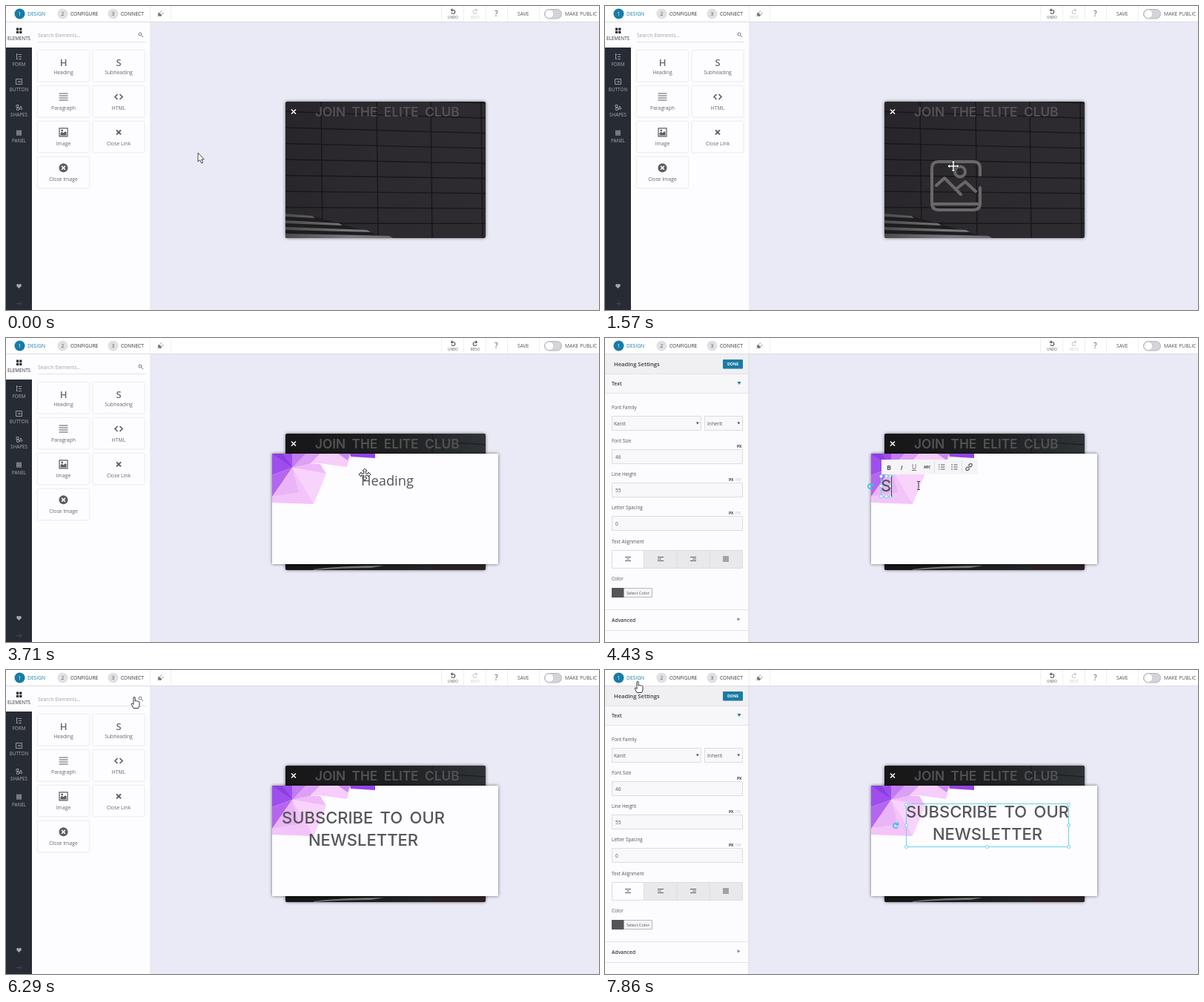
Animation, 800 px wide and 410 px high, one loop 8000 ms. Source, as an HTML page:

```html
<!DOCTYPE html>
<html lang="en">
<head>
<meta charset="utf-8">
<title>Popup editor</title>
<style>
html, body { margin: 0; width: 800px; height: 410px; overflow: hidden; background: #e9eaf6; }
svg { position: absolute; left: 0; top: 0; display: block; }
text { font-family: "Open Sans", sans-serif; fill: #55555a; }
.mid { text-anchor: middle; }
.semi { font-weight: 600; fill: #3c3c42; }
.ln { fill: none; stroke: #5c5c60; stroke-width: 1.2; }
.tile { fill: #fdfcfe; filter: drop-shadow(0 .8px .8px rgba(40, 40, 60, .2)); }
.tile.hot { filter: drop-shadow(0 1px 2px rgba(40, 40, 60, .5)); }
#tiles text { fill: #68686c; }
.join { font: 600 17.3px Inter, sans-serif; word-spacing: 4px; fill: #525154; }
#head { position: absolute; white-space: pre; text-align: center; line-height: 29.5px; color: #55555a;
  font-family: "Open Sans", sans-serif; font-size: 18.3px; }
#head.big { font: 500 22px/29.5px Inter, sans-serif; word-spacing: 3.5px; }
#frame { position: absolute; inset: 0 -.5px; border: 1px solid #69d3e8; box-sizing: border-box; }
#frame i { position: absolute; width: 3px; height: 3px; margin: -2.5px; border: 1px solid #69d3e8; border-radius: 50%; background: #fff; }
#frame svg { left: -20px; top: calc(50% - 5px); overflow: visible; }
#caret { position: absolute; right: -1px; top: 1px; bottom: 1px; width: 1px; background: #444; }
</style>
</head>
<body>
<svg id="base" width="800" height="410">
  <defs>
    <linearGradient id="wall" x2="1" y2=".25">
      <stop offset="0" stop-color="#272529"/><stop offset=".5" stop-color="#2c2a2e"/><stop offset="1" stop-color="#2d2b2f"/>
    </linearGradient>
    <linearGradient id="stair"><stop offset="0" stop-color="#4b4a4d"/><stop offset=".6" stop-color="#7c7a7e"/><stop offset="1" stop-color="#6a686c"/></linearGradient>
    <linearGradient id="shade"><stop offset="0" stop-color="#161617"/><stop offset=".55" stop-color="#1f2022"/><stop offset="1" stop-color="#2f3337"/></linearGradient>
    <filter id="lift" x="-10%" y="-10%" width="120%" height="120%">
      <feDropShadow dx="0" dy="0" stdDeviation="2" flood-color="#000" flood-opacity=".55"/>
    </filter>
    <clipPath id="cardClip"><rect x="377" y="129" width="270" height="184" rx="3"/></clipPath>
  </defs>

  <rect width="800" height="410" fill="#e9eaf6"/>
  <rect x="377" y="129" width="270" height="184" rx="3" fill="#242326" filter="url(#lift)"/>
  <g clip-path="url(#cardClip)">
    <rect x="377" y="129" width="270" height="184" fill="url(#wall)"/>
    <g id="bricks" fill="none" stroke="#171619" stroke-width="1.4"></g>
    <path d="M377 280l36 3 106 30H377z" fill="#1d1c1f"/>
    <path d="M377 280l36 3 4 3-40-2zM377 289l72 4 5 3-77-3zM377 298l110 4 5 3-115-3zM377 307l140 3 7 4H377z" fill="url(#stair)"/>
    <g id="dim">
      <rect x="377" y="129" width="270" height="184" fill="url(#shade)"/>
      <path d="M575 129v26M575 139l72 5" stroke="#17191b" fill="none"/>
      <path d="M415 312q40-5 95-5l-18 3q-40 0-77 3z" fill="#77777a"/>
      <rect x="377" y="305" width="120" height="2" fill="#101011"/>
      <rect x="575" y="305" width="72" height="8" fill="#2a2226"/>
    </g>
  </g>
  <text class="join" x="417" y="148.800">JOIN THE ELITE CLUB</text>
  <path d="M385 139.500l6 6m0-6l-6 6" stroke="#fff" stroke-width="1.5"/>

  <g id="sheet">
    <rect x="359" y="156" width="305" height="149" fill="#fdfcfe" filter="url(#lift)"/>
    <g>
      <path d="M359 156h27v19l-27 10z" fill="#a04dee"/>
      <path d="M359 156h14l13 18z" fill="#8a3fe0"/>
      <path d="M386 156h38l-14 14-24 5z" fill="#dca0f6"/>
      <path d="M386 156h18l-18 19z" fill="#c27bf3"/>
      <path d="M410 170l-24 5 46 8-8-13z" fill="#f0b9fa"/>
      <path d="M424 156h41l-5 18-36-5-14 1z" fill="#f6cdfb"/>
      <path d="M464 156h34v6l-33-2z" fill="#9444e6"/>
      <path d="M448 156h16l-3 9z" fill="#c98af3"/>
      <path d="M359 185l27-10-25 38-2 1z" fill="#b566ee"/>
      <path d="M386 175l-27 39v8l56 2-14-28z" fill="#f3c4f9"/>
      <path d="M386 175l46 8-17 41z" fill="#f8d3fb"/>
      <path d="M386 175l-25 38 34-5z" fill="#eab4f7"/>
    </g>
  </g>

  <g id="elements">
    <rect y="21" width="195" height="389" fill="#fdfcfe"/>
    <path d="M195 22v388" stroke="#e2e2ec"/>
    <rect y="21" width="35" height="389" fill="#272b34"/>
    <rect y="21" width="35" height="35" fill="#fdfcfe"/>
    <path d="M14 29.500h3.200v3.200H14zm4.200 0h3.200v3.200h-3.200zm-4.200 4.200h3.200v3.200H14zm4.200 0h3.200v3.200h-3.200z" fill="#26262b"/>
    <g fill="none" stroke="#989ba3">
      <path d="M14.500 64v8M17 65.500h4M17 68.500h4M17 71.500h4M14 65.500h2M14 71.500h2"/>
      <path d="M13.500 98.500h8v7h-8zM15.500 102h4m-1.500-1.500l1.500 1.500-1.500 1.500"/>
      <path d="M14 133.500h3v3h-3zM18 139l2-4 2 4z"/><circle cx="16" cy="139" r="1.700"/>
      <path d="M14 169h7M14 171.500h7M14 174h7M15 167.500v7M17.500 167.500v7M20 167.500v7" stroke-width="1.200"/>
      <path d="M14 401.500h7m-3-3l3 3-3 3" stroke="#444852"/>
    </g>
    <path d="M17.500 381l-3-3a1.800 1.800 0 0 1 3-2.300 1.800 1.800 0 0 1 3 2.300z" fill="#a4a6ad"/>
    <path d="M43 48.500h145" stroke="#e2e2e7"/>
    <circle cx="181" cy="38" r="2" fill="none" stroke="#77777c"/><path d="M182.500 39.500l2.500 2.500" stroke="#77777c"/>
    <g id="tiles"></g>
  </g>

  <g id="settings">
    <rect y="21" width="194" height="389" fill="#fcfbfd"/>
    <rect y="21" width="194" height="27" fill="#f0eff2"/>
    <rect y="48" width="194" height="26" fill="#f7f6f9"/>
    <path d="M0 48.500h194M0 74.500h194M0 366.500h194M0 394.500h194" stroke="#e4e3e8"/>
    <path d="M194 22v388" stroke="#d8d8e2"/>
    <rect x="159" y="29" width="27" height="12.500" rx="1" fill="#1b7ba3"/>
    <path d="M178.500 59h5l-2.500 4z" fill="#1b7f8f"/><path d="M178.500 377l4 2.300-4 2.300z" fill="#8b8b91"/>
    <g fill="#f8f7f9" stroke="#dddce1">
      <path d="M9.500 105.500h120v19H9.500zM134.500 105.500h51v19h-51zM9.500 150.500h176v19H9.500zM9.500 195.500h176v19H9.500zM9.500 240.500h176v19H9.500z"/>
      <path d="M9.500 286.500h176v24H9.500z" fill="#e9e8eb"/><path d="M9.500 286.500h43v24h-43z" fill="#fdfcfe"/>
      <path d="M97 287v23M141 287v23"/>
      <path d="M9.500 337.500h54v12h-54z" fill="#f5f4f6" stroke="#bbb"/>
    </g>
    <path d="M9 337h16.500v13H9z" fill="#555558"/>
    <path d="M123 113.500h3.600l-1.800 3zM178.500 113.500h3.600l-1.800 3z" fill="#444"/>
    <path class="ln" style="stroke-width:1" d="M27 295.500h8M29 298h4M27 300.500h8M71 295.500h8M71 298h5M71 300.500h8M115 295.500h8M118 298h5M115 300.500h8M159 295h8M159 297h8M159 299h8M159 301h8"/>
    <g id="fields"></g>
  </g>

  <g id="topbar">
    <rect width="800" height="21" fill="#fff"/>
    <path d="M0 21.500h800" stroke="#dcdce5"/>
    <path d="M194.500 0v21M222.500 0v21M587.500 0v21M617.500 0v21M647.500 0v21M676.500 0v21M719.500 0v21" stroke="#efeff4"/>
    <circle cx="18.500" cy="10.500" r="7" fill="#177ca6"/>
    <circle cx="76.500" cy="10.500" r="7" fill="#e0e0e5"/><circle cx="144.500" cy="10.500" r="7" fill="#e0e0e5"/>
    <path d="M204.500 14l2-2m0-3l3.500 3.500q-2 2-4 .3t.5-3.800zM208 8.500l2-2M210.500 11l2-2" stroke="#77777c" fill="#77777c"/>
    <path class="ln" d="M601 5.500h2.500a2.500 2.500 0 1 1-2.600 3.300M602.500 3.700l-2 1.800 2 1.800"/>
    <rect x="726.500" y="4.500" width="23" height="12.500" rx="6.200" fill="#d4d4da" stroke="#b5b5bd"/>
    <circle cx="733" cy="10.700" r="5.800" fill="#fff" stroke="#b5b5bd" stroke-width=".6"/>
    <g id="redo">
      <path class="ln" d="M635 5.500h-2.500a2.500 2.500 0 1 0 2.600 3.300M633.500 3.700l2 1.800-2 1.800"/>
      <text class="mid" x="633" y="16.800" font-size="4.700">REDO</text>
    </g>
  </g>
</svg>

<div id="head"><span id="words"></span><div id="frame">
  <svg width="10" height="10"><path d="M7.800 3.200A3.300 3.300 0 1 0 8 6.500M8.500 .5V3.700H5.300" fill="none" stroke="#2cc4df" stroke-width="1.500"/></svg>
</div><div id="caret"></div></div>

<svg id="over" width="800" height="410">
  <g id="tools">
    <rect x="373" y="164" width="130" height="20" fill="#f5f4f6"/>
    <path d="M444.500 166v16M481.500 166v16" stroke="#dddce0"/>
    <text class="mid" x="383" y="177.500" font-size="9" font-weight="700">B</text>
    <text class="mid" x="400" y="177.500" font-size="9" font-style="italic" font-weight="600">I</text>
    <text class="mid" x="417" y="177" font-size="8.500" text-decoration="underline">U</text>
    <text class="mid" x="434.500" y="175.500" font-size="4.500" font-weight="700" text-decoration="line-through">ABC</text>
    <path class="ln" style="stroke-width:1" d="M453 171h5.500M453 174h5.500M453 177h5.500M450 171h1.500M450 174h1.500M450 177h1.500M470.500 171h5M470.500 174h5M470.500 177h5M468 170v2M468 173v2M468 176v2"/>
    <path class="ln" d="M490 172l2-2a1.900 1.900 0 0 1 2.700 2.700l-2 2M492 176l-2 2a1.900 1.900 0 0 1-2.700-2.700l2-2M489.500 175.500l3-3"/>
  </g>
  <g id="guide">
    <path d="M391.500 129v184" stroke="#c9788f"/>
    <rect x="509" y="222.500" width="77" height="12.500" rx="2" fill="#4d4c50" opacity=".85"/>
    <text x="512" y="230.800" font-size="5.200" style="fill:#fff">L:27 T:100.38751220703125</text>
  </g>
  <circle id="pulse" fill="none" stroke="#8fdbef" stroke-width="2.6"/>
  <g id="ghost" fill="none" stroke="#69686a" stroke-width="4" stroke-linecap="round" stroke-linejoin="round">
    <path d="M36 12V3q0-9-9-9H-20q-9 0-9 9V50q0 9 9 9H27q9 0 9-9V29M-28 51H35"/>
    <circle cx="9" cy="7.500" r="7"/>
    <path d="M-23 26l11-10 22 22M6 29l10-8 14 13"/>
  </g>
  <g id="arrow"><path d="M0 0v12l2.700-2.300 2 4.300 2-.9-2-4.200h3.500z" fill="#fff" stroke="#333" stroke-width=".9"/></g>
  <g id="move"><path d="M0-8l3 3.200H1.200V-1.200H4.800V-3L8 0 4.800 3V1.200H1.200V4.800H3L0 8-3 4.800h1.800V1.200H-4.800V3L-8 0l3.200-3v1.800h3.600V-4.800H-3z" fill="#fff" stroke="#333" stroke-width="1"/></g>
  <g id="hand"><path d="M0 1q1.300-1.500 2.200 0V6q1-.8 2 0 1-.7 2 .4 1.500-.4 1.800 1v4.600l-1.500 3.500H0l-2.600-5q-.4-2 1.400-1.400L0 10.500z" fill="#fff" stroke="#222" stroke-width=".9"/></g>
  <g id="beam"><path d="M-2-5.500h1.500L0-5l.5-.5H2M0-5V5M-2 5.500h1.500L0 5l.5.500H2" fill="none" stroke="#222" stroke-width=".9"/></g>
</svg>

<script>
const $ = id => document.getElementById(id);
const add = (id, markup) => $(id).insertAdjacentHTML('beforeend', markup);
const label = (x, y, s, size, more = '') => `<text x="${x}" y="${y}" font-size="${size}" ${more}>${s}</text>`;
const mid = 'class="mid"', semi = 'class="semi"';
const ink = c => `style="fill:${c}"`;

// Wall joints
for (let i = 0; i < 9; i++) add('bricks', `<path d="M377 ${121 + i * 21.5}L647 ${131 + i * 20.3}"/>`);
[427, 502, 575, 643].forEach(x => add('bricks', `<path d="M${x - 2} 129L${x} 313"/>`));

// Sidebar and element tiles
['ELEMENTS', 'FORM', 'BUTTON', 'SHAPES', 'PANEL'].forEach((s, i) =>
  add('elements', label(17.5, i ? 46.5 + i * 34.3 : 46, s, 6.3, mid + ink(i ? '#a9abb2' : '#333338'))));
add('elements', label(43, 42, 'Search Elements...', 6.8, ink('#a3a3a9')));

const glyph = s => label(0, 6.6, s, 13, mid + ' font-weight="600"');
const cross = 'M-3-3l6 6m0-6l-6 6';
const tiles = [
  ['Heading', glyph('H')],
  ['Subheading', glyph('S')],
  ['Paragraph', '<path class="ln" d="M-6-4.500H6M-6-1.500H6M-6 1.500H6M-6 4.500H6"/>'],
  ['HTML', '<path class="ln" style="stroke-width:1.600" d="M-1.500-3.500L-5 0l3.500 3.500M1.500-3.500L5 0 1.500 3.500"/>'],
  ['Image', '<path class="ln" d="M-5.500-5.500h11v11h-11z"/><path d="M-4 4V1l2-2 2 2 2.500-2.500L4 0V4z" fill="#5c5c60"/><circle cx="-1.800" cy="-2.500" r="1.300" fill="#5c5c60"/>'],
  ['Close Link', `<path class="ln" style="stroke-width:2" d="${cross}"/>`],
  ['Close Image', `<circle r="6" fill="#5c5c60"/><path d="${cross}" transform="scale(.8)" stroke="#fff" stroke-width="2"/>`]
];
tiles.forEach(([name, icon], i) => {
  const x = 43 + i % 2 * 74.5, y = 60 + (i >> 1) * 47.9;
  add('tiles', `<g transform="translate(${x} ${y})"><rect class="tile" width="69" height="41.500" rx="1"/>
    <g transform="translate(34.500 14.600)">${icon}</g>${label(34.5, 32, name, 6.8, mid)}</g>`);
});
const headingTile = document.querySelector('.tile');

// Settings panel
add('fields', label(12, 38, 'Heading Settings', 7.6, semi) + label(9, 64, 'Text', 6.8, semi)
  + label(9, 382.5, 'Advanced', 6.8, semi) + label(172.5, 37.3, 'DONE', 5.2, mid + ' font-weight="700" ' + ink('#fff'))
  + label(12, 118, 'Kanit', 6.6) + label(138, 118, 'Inherit', 6.6) + label(29, 345.7, 'Select Color', 5.6));
[['Font Family', 95.5], ['Font Size', 141], ['Line Height', 186], ['Letter Spacing', 231], ['Text Alignment', 276.5], ['Color', 327]]
  .forEach(([s, y]) => add('fields', label(9, y, s, 6.3)));
[['46', 163], ['55', 208], ['0', 253]].forEach(([s, y], i) => {
  add('fields', label(14, y, s, 6.6) + label(i ? 167 : 178, y - 15.5, 'PX', 5, semi + ' style="font-weight:700"'));
  if (i) add('fields', label(176, y - 15.5, 'EM', 5, ink('#c4c4c9')));
});

// Top bar
add('topbar', label(29, 13, 'DESIGN', 6.7, ink('#177ca6')) + label(87, 13, 'CONFIGURE', 6.7, ink('#333338'))
  + label(155, 13, 'CONNECT', 6.7, ink('#333338')) + label(690, 13, 'SAVE', 6.8) + label(754, 13, 'MAKE PUBLIC', 6.8)
  + label(603, 16.8, 'UNDO', 4.7, mid) + label(661.5, 14.3, '?', 10, mid));
[18.5, 76.5, 144.5].forEach((x, i) => add('topbar', label(x, 13, i + 1, 6.6, mid + ink(i ? '#55555a' : '#fff'))));

// Selection handles
for (const x of [0, 50, 100]) for (const y of [0, 50, 100])
  if (x !== 50 || y !== 50) add('frame', `<i style="left:${x}%;top:${y}%"></i>`);

// Pointer and headline paths: [step, x, y]
const pointer = [
  [0, 259, 198], [2, 130, 184], [4, 86, 175], [5, 87, 176], [6, 120, 182], [8, 270, 208], [11, 470, 216],
  [12, 500, 206], [14, 500, 206], [15, 450, 190], [18, 72, 78], [19, 84, 82], [22, 440, 176], [23, 478, 186],
  [26, 484, 184], [28, 380, 193], [29, 423, 199], [42, 423, 199], [43, 172, 36], [44, 172, 36], [46, 485, 221],
  [48, 508, 217], [50, 522, 214], [51, 440, 185], [53, 110, 60], [54, 46, 18], [55, 43, 15]
];
const headline = [[29, 372, 185], [46, 372, 185], [48, 391, 180], [50, 406, 177.3]];
const copy = 'SUBSCRIBE TO OUR\nNEWSLETTER';

function along(path, f) {
  let i = 0;
  while (i < path.length - 2 && f > path[i + 1][0]) i++;
  const [a, x, y] = path[i], [b, u, v] = path[i + 1];
  const k = Math.max(0, Math.min(1, (f - a) / (b - a)));
  return [x + (u - x) * k, y + (v - y) * k];
}

const show = (id, on) => $(id).style.visibility = on ? 'visible' : 'hidden';

function render(f) {
  const on = (a, b) => f >= a && f <= b;
  const [x, y] = along(pointer, f);

  const shape = on(4, 11) || on(18, 28) || on(46, 50) ? 'move'
    : on(43, 44) || f >= 54 ? 'hand' : on(30, 42) ? 'beam' : 'arrow';
  for (const id of ['arrow', 'move', 'hand', 'beam']) show(id, id === shape);
  $(shape).setAttribute('transform', `translate(${x} ${y})`);

  show('ghost', on(6, 11));
  $('ghost').setAttribute('transform', `translate(${x} ${y})`);
  show('sheet', f >= 12);
  show('dim', f >= 12);
  $('redo').style.opacity = on(12, 28) ? 1 : .3;
  headingTile.classList.toggle('hot', on(18, 19));

  const editing = on(29, 43) || f >= 51;
  show('settings', editing);
  show('elements', !editing);
  show('tools', on(30, 42));
  show('guide', f === 48);

  // Click rings
  const ring = [[5, 8, 87, 176], [19, 21, 76, 80], [47, 49, 485, 221]].find(([a, b]) => on(a, b));
  show('pulse', ring);
  if (ring) {
    const [a, , cx, cy] = ring, age = f - a;
    Object.entries({ cx, cy, r: 6.5 + age * .9, opacity: .95 - age * .08 }).forEach(([k, v]) => $('pulse').setAttribute(k, v));
  }

  // Headline: dragged, typed, then moved
  const [hx, hy] = f < 29 ? [x - 5, y - 7.5] : along(headline, f);
  const typed = f < 38 ? 2 * (f - 31) + 1 : 13 + 3 * (f - 37);
  show('head', f >= 19);
  $('head').className = f > 30 ? 'big' : '';
  $('head').style.left = hx + 'px';
  $('head').style.top = hy + 'px';
  $('words').textContent = f > 30 ? copy.slice(0, typed) : 'Heading';
  show('frame', editing);
  $('frame').style.transform = f >= 51 ? 'translateY(3px)' : '';
  show('caret', on(30, 42));
}

// Seven steps a second, eight seconds a loop
const start = performance.now();
function tick() {
  const t = (performance.now() - start) % 8000;
  render(Math.min(55, Math.floor((t + 5) * 7 / 1000)));
  requestAnimationFrame(tick);
}
tick();
</script>
</body>
</html>
```
